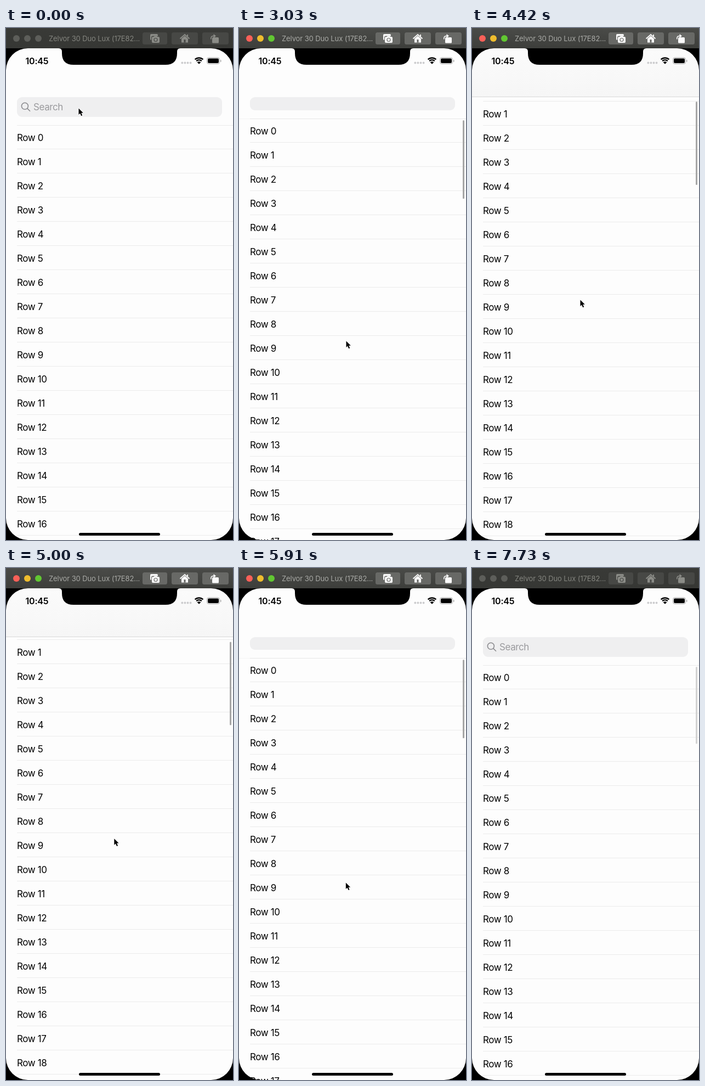
Animation of 414 by 933 pixels, one loop 8.73 s. Source, as an HTML page with a canvas:

```html
<!DOCTYPE html>
<html lang="en">
<head>
<meta charset="utf-8">
<title>Collapsing search list</title>
<style>
  html, body { margin: 0; height: 100%; overflow: hidden; background: #000; }
  canvas { display: block; }
</style>
</head>
<body>
<canvas id="stage" width="414" height="933"></canvas>
<script>
const ctx = document.getElementById('stage').getContext('2d');
const LOOP = 8730, ROW = 44, HEADER = 177, BAR_MIN = 125;
const FONT = 'Inter, Roboto, sans-serif';

// [time, list offset]
const SCROLL = [[0, 0], [3029, 0], [3030, 12], [3190, 22], [3420, 22], [3900, 51], [4250, 75], [4420, 87],
  [4650, 98], [4930, 98], [5330, 52], [5760, 27], [6050, 0], [6440, -11], [6540, -11], [6640, -4], [6780, 0]];
// [time, x, y] of the pointer tip
const PATH = [[0, 132, 146], [509, 132, 146], [510, 72, 190], [589, 72, 190], [1300, 92, 522], [1379, 92, 522],
  [1380, 193, 592], [2090, 193, 592], [2500, 192, 602], [2960, 195, 584], [3030, 195, 570], [3190, 196, 560],
  [3420, 196, 560], [3900, 197, 526], [4420, 197, 495], [4650, 197, 484], [4930, 197, 484], [5330, 196, 533],
  [5760, 195, 560], [6440, 192, 618], [6620, 192, 620]];

const clamp = v => Math.max(0, Math.min(1, v));

function sample(keys, t) {
  const i = keys.findIndex(k => k[0] > t);
  if (i < 0) return keys[keys.length - 1].slice(1);
  const a = keys[i - 1], b = keys[i], p = (t - a[0]) / (b[0] - a[0]);
  return a.slice(1).map((v, n) => v + (b[n + 1] - v) * p);
}

function box(x, y, w, h, r, color) {
  ctx.fillStyle = color;
  ctx.beginPath();
  ctx.roundRect(x, y, w, h, r);
  ctx.fill();
}

function dot(x, y, r, color) {
  box(x - r, y - r, 2 * r, 2 * r, r, color);
}

function label(text, x, y, size, color, weight = 400, spacing = 0) {
  ctx.font = `${weight} ${size}px ${FONT}`;
  ctx.letterSpacing = spacing + 'px';
  ctx.fillStyle = color;
  ctx.fillText(text, x, y);
}

function stroke(d, color, width) {
  ctx.strokeStyle = color;
  ctx.lineWidth = width;
  ctx.stroke(new Path2D(d));
}

function shape(d, color) {
  ctx.fillStyle = color;
  ctx.fill(new Path2D(d));
}

function drawTitleBar(active) {
  const fill = ctx.createLinearGradient(0, 0, 0, 37);
  fill.addColorStop(0, active ? '#4a4b48' : '#393a37');
  fill.addColorStop(1, active ? '#3d3e3b' : '#363734');
  box(0, 0, 414, 37, 0, fill);
  const lights = active ? ['#fb6058', '#efbd2e', '#61c732'] : Array(3).fill('#5d5e5a');
  lights.forEach((c, i) => dot(19 + 20 * i, 19, 6, c));
  label('Zelvor 30 Duo Lux (17E82...', 78, 24, 13, active ? '#a9aaa6' : '#84857f', 400, -0.1);

  const button = active ? '#686966' : '#474845', icon = active ? '#fbfbfb' : '#8b8c87';
  [[249, 45], [302, 48], [358, 48]].forEach(([x, w]) => box(x, 8, w, 22, 3.5, button));

  box(263, 11, 14, 11, 2, icon);
  box(265, 14.5, 16, 13.5, 2.5, button);
  box(266, 16, 14, 11, 2, icon);
  box(270, 14.5, 6, 3, 1, icon);
  dot(273, 21.5, 3.6, button);
  dot(273, 21.5, 2.4, icon);

  stroke('M317.5 19.5 L326 12 L334.5 19.5', icon, 1.8);
  shape('M320 19.5 L326 14.3 L332 19.5 V26.5 H320 Z M330 12 H332 V16 L330 14 Z', icon);
  box(324.5, 21, 3, 5.5, 0, button);

  box(376, 17, 12, 10.5, 1.5, icon);
  stroke('M373.8 20.5 V19 Q373.8 14.5 379 14.5', icon, 1.6);
  shape('M378.5 11 L383 14.5 L378.5 18 Z', icon);
}

function drawList(offset) {
  for (let i = 0; i < 19; i++) {
    const y = HEADER + 43 + ROW * i - offset;
    label('Row ' + i, 20, y - 14.5, 17, '#000', 400, -0.4);
    box(20, y, 394, 1, 0, '#ebebeb');
  }
}

function drawHeader(offset) {
  const bottom = Math.max(BAR_MIN, HEADER - offset), grey = clamp((offset - 28) / 20);
  box(0, 37, 414, bottom - 37, 0, '#fdfdfd');
  ctx.globalAlpha = grey;
  const fill = ctx.createLinearGradient(0, 37, 0, bottom);
  fill.addColorStop(0, '#fbfbfb');
  fill.addColorStop(1, '#f6f6f6');
  box(0, 37, 414, bottom - 37, 0, fill);
  ctx.globalAlpha = 1;
  box(20, bottom, 394, 1, 0, '#ebebeb');
  ctx.globalAlpha = clamp(offset / 50);
  box(0, bottom, 414, 1, 0, '#d8d8d8');
  ctx.globalAlpha = 1;

  const height = Math.min(36, 36 - offset);
  if (height <= 0) return;
  box(20, 126, 374, height, Math.min(9, height / 2), '#efeff0');
  ctx.globalAlpha = clamp(1 - offset / 11);
  const shift = (height - 36) / 2;
  ctx.save();
  ctx.translate(0, shift);
  ctx.lineCap = 'round';
  stroke('M40.4 142.2 a6 6 0 1 1 -12 0 a6 6 0 1 1 12 0 M38.8 146.6 L43.6 151.3', '#8b8b8f', 1.6);
  label('Search', 50, 149.5, 17, '#9a9a9d', 400, -0.4);
  ctx.restore();
  ctx.globalAlpha = 1;
}

function drawIndicator(t, offset) {
  if (t < 3030) return;
  const top = offset < 52 ? 180 - offset : 128 + (offset - 52) * 0.17;
  const length = 140.5 + (offset < 0 ? offset * 1.1 : Math.min(offset, 52) * 0.22);
  box(408, top, 3, length, 1.5, t < 7730 ? '#a6a6a6' : '#d2d2d2');
}

function drawStatus() {
  label('10:45', 35.5, 65.5, 16, '#000', 600, -0.2);
  for (let i = 0; i < 4; i++) dot(321.3 + 5.1 * i, 63.5, 1.9, '#cbcbcd');
  ctx.lineCap = 'butt';
  ctx.strokeStyle = '#000';
  ctx.lineWidth = 2.3;
  for (const r of [10.8, 7.1]) {
    ctx.beginPath();
    ctx.arc(352, 65.3, r, -Math.PI * 0.74, -Math.PI * 0.26);
    ctx.stroke();
  }
  shape('M352 65.8 L348.6 62.4 Q352 59.4 355.4 62.4 Z', '#000');
  ctx.strokeStyle = '#a8a8a8';
  ctx.lineWidth = 1;
  ctx.beginPath();
  ctx.roundRect(366.5, 54, 23, 11.5, 3.3);
  ctx.stroke();
  box(368, 55.5, 20, 8.5, 2, '#000');
  box(391, 58, 1.4, 4, 0.7, '#a8a8a8');
}

function drawBezel() {
  const frame = new Path2D('M0 37 H414 V933 H0 Z');
  frame.roundRect(0, 37, 414, 896, 40);
  ctx.fillStyle = '#000';
  ctx.fill(frame, 'evenodd');
  shape('M96 37 Q102 37 102 43 V46 Q102 67 123 67 H291 Q312 67 312 46 V43 Q312 37 318 37 Z', '#000');
  box(133, 920, 148, 5, 2.5, '#000');
}

function drawPointer(t) {
  if ((t >= 590 && t < 1300) || t >= 6620) return;
  const [x, y] = sample(PATH, t);
  ctx.save();
  ctx.translate(x, y);
  ctx.lineJoin = 'round';
  const arrow = 'M0.5 0.5 V12 L3.1 9.6 L5.2 14.2 L7.2 13.3 L5.2 8.8 H8.8 Z';
  stroke(arrow, '#fff', 1.6);
  shape(arrow, '#000');
  ctx.restore();
}

function draw(t) {
  const offset = Math.round(sample(SCROLL, t)[0]);
  box(0, 0, 414, 933, 0, '#fdfdfd');
  drawList(offset);
  drawHeader(offset);
  drawIndicator(t, offset);
  drawStatus();
  drawBezel();
  drawTitleBar(t >= 2090 && t < 7730);
  drawPointer(t);
}

const start = performance.now();
function tick() {
  draw((performance.now() - start) % LOOP);
  requestAnimationFrame(tick);
}
tick();
</script>
</body>
</html>
```
